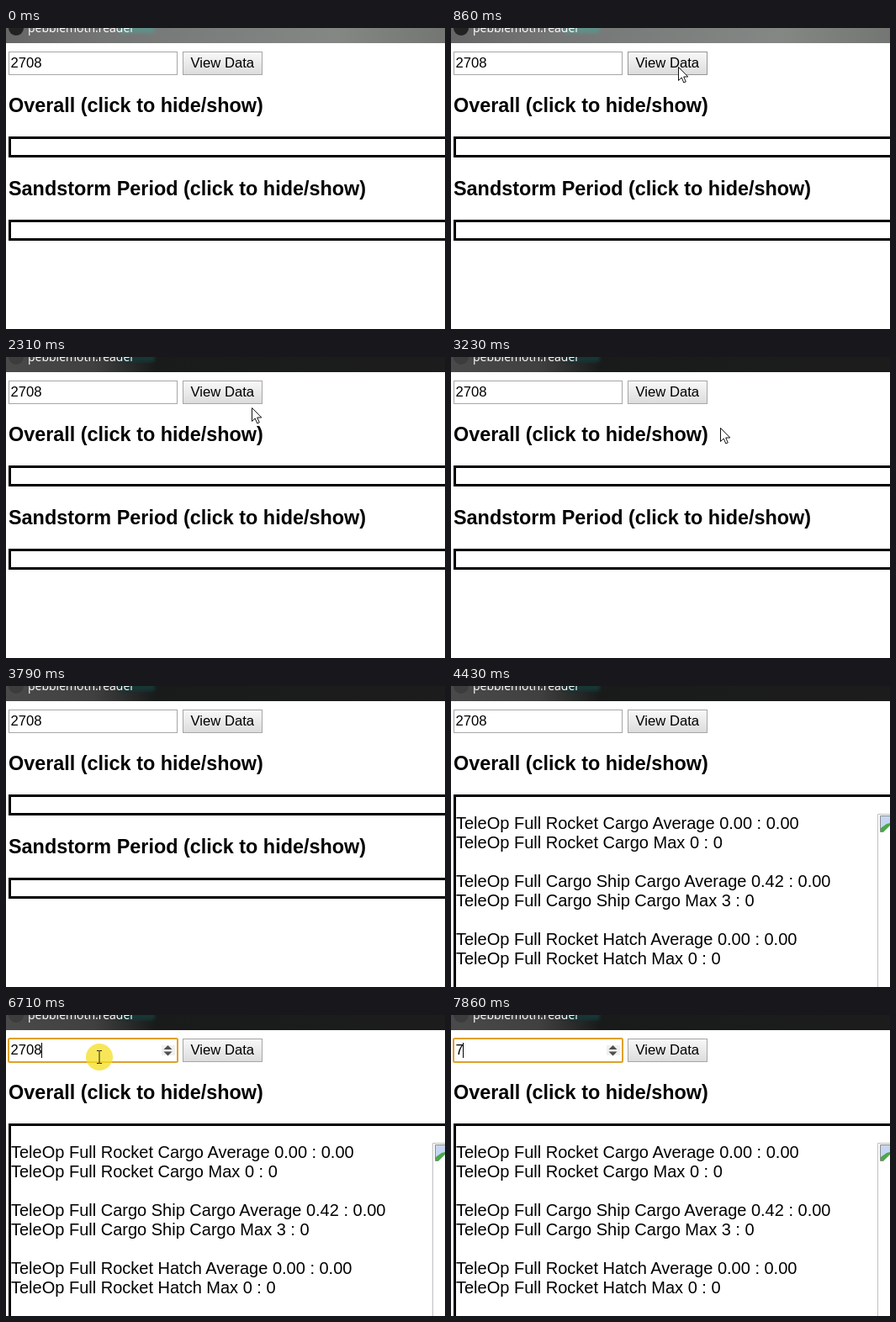
Animation of 522 by 358 pixels, one loop 8000 ms. Source, as an HTML page:

```html
<!DOCTYPE html>
<html lang="en">
<head>
<meta charset="utf-8">
<style>
  html, body { margin: 0; width: 100%; height: 100%; overflow: hidden; background: #fff; }
  svg { display: block; width: 522px; height: 358px; font: 20px "Liberation Sans", Arial, sans-serif; cursor: default; }
  .title { font: 14px "Open Sans", sans-serif; }
  .control { font-size: 16.67px; }
  .heading { font-size: 23.4px; font-weight: bold; }
  .box { fill: none; stroke: #000; stroke-width: 3; }
</style>
</head>
<body>
<svg viewBox="0 0 522 358">
  <defs>
    <linearGradient id="face" x2="0" y2="1">
      <stop stop-color="#f8f8f8"/><stop offset="1" stop-color="#dcdcdc"/>
    </linearGradient>
    <linearGradient id="pressedFace" x2="0" y2="1">
      <stop stop-color="#e6e6e6"/><stop offset="1" stop-color="#f0f0f0"/>
    </linearGradient>
    <linearGradient id="idleBar">
      <stop stop-color="#666"/><stop offset=".25" stop-color="#757776"/>
      <stop offset=".75" stop-color="#858785"/><stop offset="1" stop-color="#747674"/>
    </linearGradient>
    <linearGradient id="activeBar">
      <stop stop-color="#4a4a4a"/><stop offset=".2" stop-color="#404040"/>
      <stop offset=".34" stop-color="#191b1b"/><stop offset="1" stop-color="#1c1c1c"/>
    </linearGradient>
    <filter id="soft"><feGaussianBlur stdDeviation="2"/></filter>
  </defs>

  <rect id="bar" width="522" height="18"/>
  <rect id="glow" x="134" y="-6" width="43" height="12" rx="4" filter="url(#soft)"/>
  <circle id="icon" cx="12" cy="0" r="9"/>
  <text class="title" x="26" y="4.5" fill="#fff">pebblemoth.reader</text>

  <rect x="3.5" y="28.5" width="200" height="27" fill="#fff" stroke="#a6a6a6"/>
  <rect id="focus" x="3" y="28" width="201" height="28" rx="1.5" fill="none" stroke="#dfa02c" stroke-width="2"/>
  <text id="value" class="control" x="5.5" y="47"></text>
  <path id="caret" d="M0 33v18" stroke="#000"/>
  <g id="spinner">
    <path d="M185 36h16v12h-16z" fill="#f0f0f0"/>
    <path d="M187.5 41l5-5 5 5zM187.5 43.500h10l-5 5z" fill="#505050"/>
  </g>

  <rect id="button" x="210.500" y="28.500" width="94" height="27"/>
  <text class="control" x="219.500" y="47">View Data</text>
  <text class="heading" x="3" y="100">Overall (click to hide/show)</text>

  <g id="empty">
    <path class="box" d="M530 130.500H4.500v22H530M530 229.500H4.500v22H530"/>
    <text class="heading" x="3" y="199">Sandstorm Period (click to hide/show)</text>
  </g>
  <g id="data">
    <path class="box" d="M530 130.500H4.500V365"/>
    <g id="rows"></g>
    <path d="M530 152.500H507.500V365" fill="none" stroke="#c0c0c0"/>
    <path d="M510.500 154.500h18v19h-18z" fill="#c6d6f2" stroke="#8c8c8c"/>
    <path d="M511 173v-4l7-5 4-1v4l-7 6z" fill="#4aa84a"/>
    <path d="M514 174l8-8v8z" fill="#fff"/>
  </g>

  <circle id="click" r="16" fill="#f4de20" fill-opacity=".75"/>
  <path id="arrow" d="M.5.500v16l3.700-3.500 2.600 6 2.500-1.100-2.600-5.900h5.100z" fill="#fff" stroke="#111"/>
  <path id="beam" d="M-3-7.500h2.500l.500.500.500-.500H3M0-7V7M-3 7.500h2.500L0 7l.500.500H3" fill="none" stroke="#222"/>
</svg>
<script>
const $ = id => document.getElementById(id);
const show = (id, on) => $(id).setAttribute('display', on ? 'inline' : 'none');
const set = (id, attrs) => Object.entries(attrs).forEach(([k, v]) => $(id).setAttribute(k, v));

const LOOP = 8000, ACTIVE = 1370, LOADED = 4430, FOCUS = 6710, TYPED = 7860;

const rows = [
  [170, 'Rocket Cargo Average 0.00 : 0.00'], [193, 'Rocket Cargo Max 0 : 0'],
  [239, 'Cargo Ship Cargo Average 0.42 : 0.00'], [262, 'Cargo Ship Cargo Max 3 : 0'],
  [308, 'Rocket Hatch Average 0.00 : 0.00'], [331, 'Rocket Hatch Max 0 : 0']
];
$('rows').innerHTML = rows.map(([y, s]) => `<text x="6" y="${y}">TeleOp Full ${s}</text>`).join('');

// Each visible stretch of pointer travel: [time, x, y], held until its end time.
const runs = [
  { end: 3790, keys: [[580, 484, 95], [1010, 241, 39], [2210, 241, 39], [2490, 328, 75],
    [3229, 328, 75], [3230, 322, 84], [3480, 48, 76], [3780, 441, 126]] },
  { end: 6790, keys: [[5170, 463, 167], [5680, 195, 59], [5960, 145, 51], [5990, 145, 51],
    [6040, 142, 51], [6330, 142, 51], [6380, 128, 50], [6709, 128, 50], [6710, 111, 50]] },
  { end: 7350, keys: [[7070, 36, 112], [7340, 438, 194]] }
];

function pointer(t) {
  const run = runs.find(r => t >= r.keys[0][0] && t < r.end);
  if (!run) return null;
  const i = run.keys.findIndex(k => k[0] > t);
  if (i < 0) return run.keys.at(-1).slice(1);
  const [t0, x0, y0] = run.keys[i - 1], [t1, x1, y1] = run.keys[i];
  const p = (t - t0) / (t1 - t0), e = p * (2 - p);
  return [x0 + (x1 - x0) * e, y0 + (y1 - y0) * e];
}

const inside = ([x, y], l, t, r, b) => x >= l && x <= r && y >= t && y <= b;

function overText(p, t) {
  if (inside(p, 3, 74, 305, 106)) return true;
  if (t < LOADED) return inside(p, 3, 178, 428, 205);
  return rows.some(([y, s]) => inside(p, 6, y - 18, 108 + s.length * 9.4, y + 5));
}

function draw(t) {
  const active = t >= ACTIVE, focused = t >= FOCUS, loaded = t >= LOADED;
  const at = pointer(t);
  const overInput = at && inside(at, 3, 28, 204, 56);
  const overButton = at && inside(at, 210, 28, 305, 56);
  const clicking = (active && t < 1470) || (focused && t < 6750);
  const beam = at && (overInput || overText(at, t));

  set('bar', { fill: `url(#${active ? 'activeBar' : 'idleBar'})` });
  set('glow', { fill: active ? '#123835' : '#619089' });
  set('icon', { fill: active ? '#3c3c3c' : '#222' });
  set('button', {
    fill: `url(#${clicking && overButton ? 'pressedFace' : 'face'})`,
    stroke: overButton ? '#969696' : '#a6a6a6'
  });
  show('empty', !loaded);
  show('data', loaded);
  show('focus', focused);
  show('spinner', focused || overInput);
  show('caret', focused);

  const typed = t >= TYPED;
  $('value').textContent = typed ? '7' : '2708';
  set('caret', { transform: `translate(${typed ? 14.5 : 42.5})` });

  show('click', clicking);
  show('arrow', at && !beam);
  show('beam', beam);
  if (at) {
    const transform = `translate(${at.map(Math.round)})`;
    ['click', 'arrow', 'beam'].forEach(id => set(id, { transform }));
  }
}

function frame() {
  draw(performance.now() % LOOP);
  requestAnimationFrame(frame);
}
frame();
</script>
</body>
</html>
```
